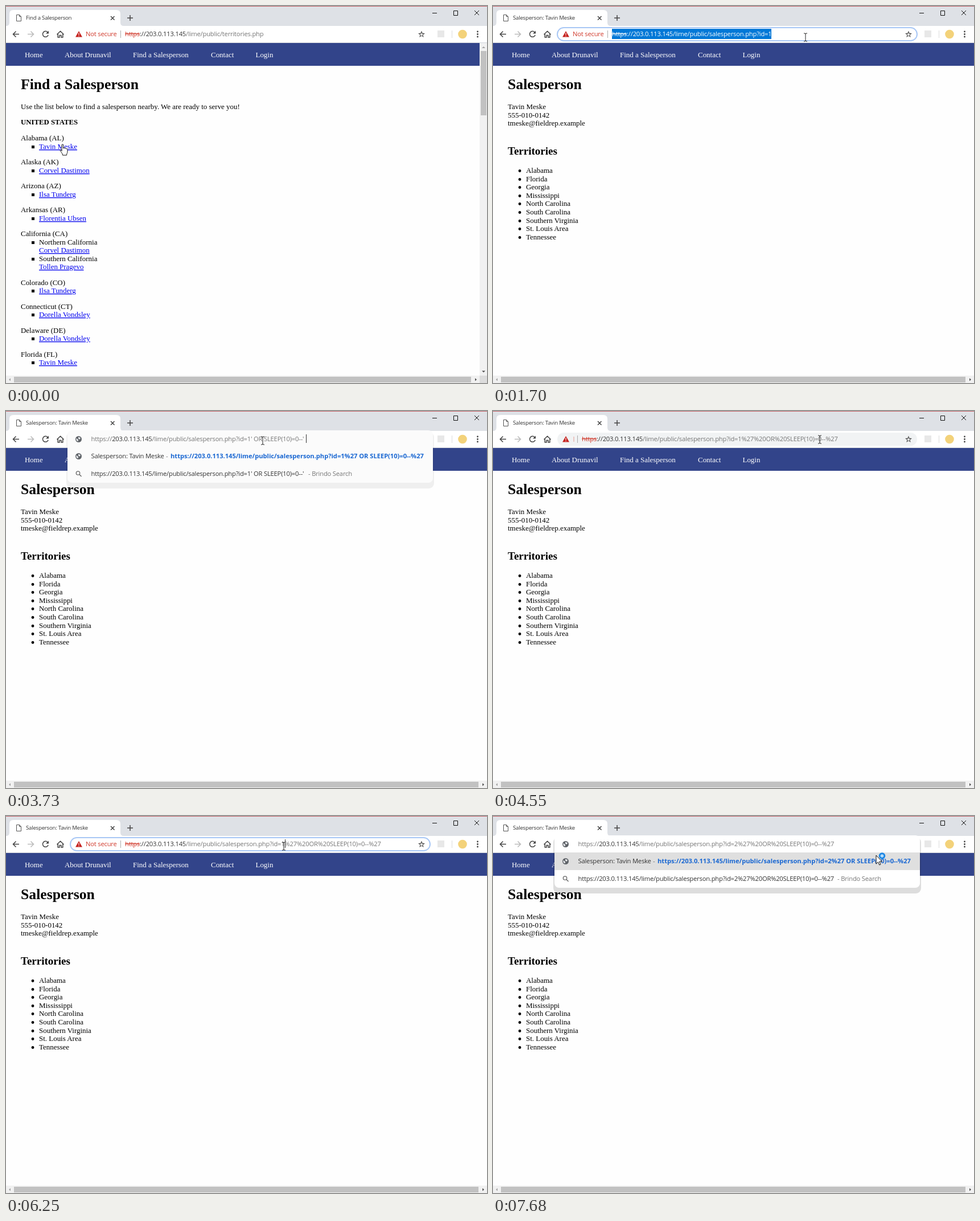
An HTML page that plays this animation: 845x662 px, repeating every 8000 ms.

```html
<!DOCTYPE html>
<html lang="en">
<head>
<meta charset="utf-8">
<title>Find a Salesperson</title>
<style>
html, body { margin: 0; width: 100%; height: 100%; overflow: hidden; background: #fff; }
svg { display: block; width: 100%; height: 100%; }
text { white-space: pre; }
.page { font: 12.95px "Liberation Serif", Times, serif; fill: #000; }
.h1 { font-size: 25.7px; font-weight: 700; }
.h2 { font-size: 19px; font-weight: 700; }
.b { font-weight: 700; font-size: 12.8px; }
.nav { fill: #fff; }
.link { fill: #00e; text-decoration: underline; }
.ui { font: 11.2px "Open Sans", "Noto Sans", sans-serif; letter-spacing: -.19px; fill: #333; }
.small { font-size: 9.6px; letter-spacing: -.2px; }
.grey { fill: #767676; }
.red { fill: #d0392b; }
.struck { text-decoration: line-through; }
.sel, .sel tspan { fill: #fff; }
.match { font-weight: 700; letter-spacing: -.04px; fill: #1967d2; }
.line { fill: none; stroke: #444; stroke-width: 1.5; }
</style>
</head>
<body>
<svg id="stage" viewBox="0 0 845 662"></svg>
<script>
const LOOP = 8000;
const HOST = '203.0.113.145';
const DIR = '/lime/public/';
const PAGE = DIR + 'salesperson.php?id=';
const REP = 'Tavin Meske';
const TAIL = '%27%20OR%20SLEEP(10)=0--%27';

const rect = (x, y, w, h, fill, more = '') =>
  `<rect x="${x}" y="${y}" width="${w}" height="${h}" fill="${fill}" ${more}/>`;
const path = (d, more = 'class="line"') => `<path d="${d}" ${more}/>`;
const fillPath = (d, color) => path(d, `fill="${color}"`);
// baselines sit on whole pixels
const text = (x, y, cls, s) => `<text x="${x}" y="${Math.round(y)}" class="${cls}">${s}</text>`;
const circle = (x, y, r, fill) => `<circle cx="${x}" cy="${y}" r="${r}" fill="${fill}"/>`;
const span = (cls, s) => `<tspan class="${cls}">${s}</tspan>`;
const within = (t, a, b) => t >= a && t < b;
const latest = (list, t) => list.filter(k => k[0] <= t).pop();

// time, x, y, shape
const pointer = [
  [0, 99, 243, 'hand'],
  [1070, 265, 205, 'arrow'], [1190, 455, 140, 'arrow'], [1310, 567, 99, 'arrow'],
  [1460, 556, 60, 'beam'], [1580, 549, 55, 'beam'],
  [3080, 546, 59, 'beam'], [3200, 527, 50, 'beam'], [3320, 501, 43, 'beam'], [3440, 482, 45, 'beam'],
  [3590, 478, 51, 'beam'], [3730, 451, 52, 'beam'], [3850, 500, 39, 'beam'], [3970, 567, 47, 'beam'],
  [4120, 574, 50, 'beam'],
  [4950, 560, 44, 'beam'], [5070, 545, 37, 'beam'],
  [5220, 532, 27, 'arrow'], [5340, 506, 18, 'arrow'], [5460, 474, 22, 'arrow'],
  [5590, 461, 39, 'beam'], [5710, 477, 47, 'beam'], [5850, 482, 49, 'beam'], [5970, 488, 53, 'beam'],
  [6400, 0, 0, 'none'],
  [6820, 629, 56, 'arrow'], [6970, 650, 63, 'arrow'], [7090, 664, 67, 'arrow'],
  [7240, 673, 69, 'busy']
];

// start, end, x of the text caret
const carets = [
  [1970, 2530, 489], [2530, 3590, 527], [3730, 4120, 527],
  [6250, 6400, 490], [6400, 6550, 483], [6820, 6970, 490], [6970, 7680, 429]
];

const arrow = path('M0 0V15L3.5 11.8 5.8 17 8 16 5.8 11H10.5Z', 'fill="#fff" stroke="#111"');
const shapes = {
  none: '',
  arrow,
  busy: arrow + '<circle cx="10.5" cy="1" r="4.3" fill="#b5dcfa" stroke="#1e88e5" stroke-width="3"/>',
  beam: path('M-3 -7H-1L0 -6 1 -7H3M0 -6V6M-3 7H-1L0 6 1 7H3', 'fill="none" stroke="#222"'),
  hand: path('M-1 1C-1 -.5 1.5 -.5 1.5 1V7C2 5.5 4 6 4 7 5 6 6.5 6.5 6.5 8 8 7 9 8 9 9.5V13C9 15 7.5 16 7.5 19H.5C.5 16 -1.5 14.5 -3.5 11.5-4.5 9.5-2.5 9-1 11.5Z',
    'fill="#fff" stroke="#111" stroke-linejoin="round"')
};

function url(x, y, cls, tail, secure = false) {
  return text(x, y, 'ui ' + cls,
    (secure ? span('red struck', 'https') + '://' : span('grey', 'https://')) + HOST + span('grey', tail));
}

const warning = fillPath('M128 44L134 54.5H122Z', '#c5221f') + rect(127.4, 47.3, 1.2, 3.6, '#fff') + rect(127.4, 52, 1.2, 1.2, '#fff');

const star = path('M730 43.5L731.6 47.6 736 47.9 732.6 50.7 733.7 55 730 52.6 726.3 55 727.4 50.7 724 47.9 728.4 47.6ZM730 46.6L729.2 49 726.8 49.1 728.7 50.6 728.1 52.8 730 51.5 731.9 52.8 731.3 50.6 733.2 49.1 730.8 49Z',
  'fill="#555" fill-rule="evenodd"');

const frame =
  rect(0, 0, 845, 35, '#dee1e6') + rect(0, 0, 845, 1, '#c4666b') +
  fillPath('M0 35Q6 35 6 29V14Q6 7 13 7H194Q201 7 201 14V29Q201 35 207 35Z', '#fff') +
  path('M18.5 15.5H23.5L26.5 18.5V26.5H18.5ZM23.5 15.5V18.5H26.5', 'fill="none" stroke="#555"') +
  path('M184 18L190.5 24.5M190.5 18L184 24.5M213 21H223M218 16V26') +
  path('M749 12.5H757M786.5 8.5H793.5V16.5H786.5ZM823 8L831 16M831 8L823 16', 'fill="none" stroke="#111"') +
  rect(0, 35, 845, 29, '#fff') + rect(0, 64, 845, 1, '#d0d3da') +
  path('M23 49.5H13M17.5 44.5L12.5 49.5 17.5 54.5') +
  path('M38 49.5H48M43.5 44.5L48.5 49.5 43.5 54.5', 'class="line" style="stroke:#bbb"') +
  path('M73.2 46A5 5 0 1 0 74.2 51') + fillPath('M75 43.5V48.5H70Z', '#444') +
  path('M89.5 50L95.5 44.3 101.5 50M91.2 49V55H94V51.5H97V55H99.8V49') +
  rect(758, 43, 12, 12, '#e8e8e8') + rect(783, 43, 1, 13, '#ddd') + circle(802, 49.5, 7.8, '#f3d27a') +
  [45, 49.5, 54].map(y => circle(828.5, y, 1.4, '#444')).join('');

const navBar = rect(0, 65, 845, 40, '#32448a') +
  [[33, 'Home'], [103, 'About Drunavil'], [223, 'Find a Salesperson'], [360, 'Contact'], [438.5, 'Login']]
    .map(([x, s]) => text(x, 90, 'page nav', s)).join('');

function bottomBar(width) {
  return rect(0, 649, width, 13, '#f1f1f1') + rect(14, 651, width - 29, 10, '#c1c1c1') +
    fillPath('M8 653.5V658.5L5 656Z', '#a3a3a3') +
    fillPath(`M${width - 8} 653.5V658.5L${width - 5} 656Z`, '#505050');
}

function territories() {
  const [al, ro, ir, el, sh, ba] = [REP, 'Corvel Dastimon', 'Ilsa Tunderg', 'Florentia Ubsen', 'Tollen Pragevo', 'Dorella Vondsley'];
  const states = [
    ['Alabama (AL)', al], ['Alaska (AK)', ro], ['Arizona (AZ)', ir], ['Arkansas (AR)', el],
    ['California (CA)', ro, 'Northern California', sh, 'Southern California'],
    ['Colorado (CO)', ir], ['Connecticut (CT)', ba], ['Delaware (DE)', ba], ['Florida (FL)', al]
  ];
  const step = 14.6;
  let y = 236, out = text(26, 146, 'page h1', 'Find a Salesperson') +
    text(26, 181, 'page', 'Use the list below to find a salesperson nearby. We are ready to serve you!') +
    text(26, 208, 'page b', 'UNITED STATES');
  for (const [state, ...reps] of states) {
    out += text(26, y, 'page', state);
    for (let i = 0; i < reps.length; i += 2) {
      y += step;
      out += rect(45, Math.round(y) - 6, 5, 5, '#000');
      if (reps[i + 1]) {
        out += text(58, y, 'page', reps[i + 1]);
        y += step;
      }
      out += text(58, y, 'page link', reps[i]);
    }
    y += 27.4;
  }
  return out + bottomBar(832) + rect(832, 65, 13, 584, '#f1f1f1') + rect(834, 79, 10, 113, '#c1c1c1') +
    fillPath('M836 74H842L839 71Z', '#a3a3a3') + fillPath('M836 640.5H842L839 643.5Z', '#505050') +
    rect(832, 649, 13, 13, '#dcdcdc');
}

function salesperson() {
  const areas = ['Alabama', 'Florida', 'Georgia', 'Mississippi', 'North Carolina', 'South Carolina',
    'Southern Virginia', 'St. Louis Area', 'Tennessee'];
  return text(26, 146, 'page h1', 'Salesperson') +
    [REP, '555-010-0142', 'tmeske@fieldrep.example'].map((s, i) => text(26, 181 + i * 14.6, 'page', s)).join('') +
    text(26, 261, 'page h2', 'Territories') +
    areas.map((s, i) => {
      const y = Math.round(293 + i * 14.6);
      return circle(47, y - 3.5, 2.4, '#000') + text(58, y, 'page', s);
    }).join('') + bottomBar(845);
}

function addressBar(t) {
  const focused = within(t, 1580, 4550) || t >= 6250;
  const selected = within(t, 1580, 1970);
  const opening = within(t, 4550, 4670);
  const x = opening ? 156 : 209;
  const tail = t < 920 ? DIR + 'territories.php'
    : t < 4550 ? PAGE + '1'
    : PAGE + (t < 6820 ? '1' : '2') + TAIL;
  const pill = focused
    ? rect(113, 38, 632, 23, '#fff', 'rx="11.5" stroke="#a8c7f5" stroke-width="2"')
    : rect(113, 38, 632, 23, t < 1580 ? '#fff' : '#f1f3f4', 'rx="11.5"');
  return pill + warning +
    (opening ? rect(141.5, 45, 1, 9, '#e59a92') : text(140, 53, 'ui red', 'Not secure')) +
    rect(x - 8, 43, 1, 13, '#aaa') +
    (selected ? rect(209, 40, 280, 18, '#0078d7') : '') +
    url(x, 53, selected ? 'sel' : '', tail, true) + star;
}

const globe = y => circle(127.5, y, 5.5, '#5f6368') +
  fillPath(`M123.5 ${y - 2}L127 ${y + 1} 126.5 ${y + 4} 123.5 ${y + 2}ZM127 ${y - 4}L131 ${y - 2.5} 129.5 ${y + .5} 127 ${y - 1}Z`, '#e8eaed');

function dropdown(t) {
  const second = t >= 6970;
  const id = second ? '2' : '1';
  const typed = PAGE + (second ? id + TAIL : "1' OR SLEEP(10)=0--'");
  const hover = t >= 7240;
  return rect(106, 37, 646, 99, '#000', `rx="9" opacity="${hover ? .13 : .06}"`) +
    rect(108, 34, 642, 92, hover ? '#fff' : '#fbfbfb', 'rx="8"') +
    (hover ? rect(108, 64, 642, 31, '#dfdfdf') : '') +
    globe(49.5) + url(149.5, 53, '', typed) +
    globe(79.5) + text(149.5, 83, 'ui', 'Salesperson: ' + REP) + text(281, 83, 'ui grey', '-') +
    text(289, 83, 'ui match', `https://${HOST}${PAGE}${id}%27 OR SLEEP(10)=0--%27`) +
    '<circle cx="126.5" cy="109" r="3.2" fill="none" stroke="#666" stroke-width="1.3"/>' +
    path('M129 111.5L132.5 115', 'stroke="#666" stroke-width="1.4"') +
    text(149.5, 114, 'ui', 'https://' + HOST + typed) +
    text(second ? 605 : 531, 114, 'ui grey', '- Brindo Search');
}

function statusBubble(t) {
  return `<g opacity="${t < 240 ? .5 : 1}">` +
    rect(-2, 645.5, 281.5, 20, '#fff', 'rx="3" stroke="#c8c8c8"') +
    text(2, 658, 'ui small grey', `https://${HOST}${PAGE}1`) + '</g>';
}

function scene(t) {
  const listing = t < 920;
  const open = within(t, 2530, 4550) || t >= 6970;
  const [, x, y, shape] = latest(pointer, t);
  const caret = carets.find(c => within(t, c[0], c[1]));
  return rect(0, 0, 845, 662, '#fefefe') + frame +
    text(35, 24, 'ui small', listing ? 'Find a Salesperson' : 'Salesperson: ' + REP) +
    navBar + (listing ? territories() : salesperson()) +
    (open ? dropdown(t) : addressBar(t)) +
    (caret ? rect(caret[2], 41, 1, 15, '#333') : '') +
    (within(t, 120, 1070) ? statusBubble(t) : '') +
    `<g transform="translate(${x} ${y})">${shapes[shape]}</g>`;
}

const stage = document.getElementById('stage');
const start = performance.now();
let shown = '';

function draw(now) {
  const markup = scene(Math.max(0, now - start) % LOOP);
  if (markup !== shown) stage.innerHTML = shown = markup;
  requestAnimationFrame(draw);
}
draw(start);
</script>
</body>
</html>
```
